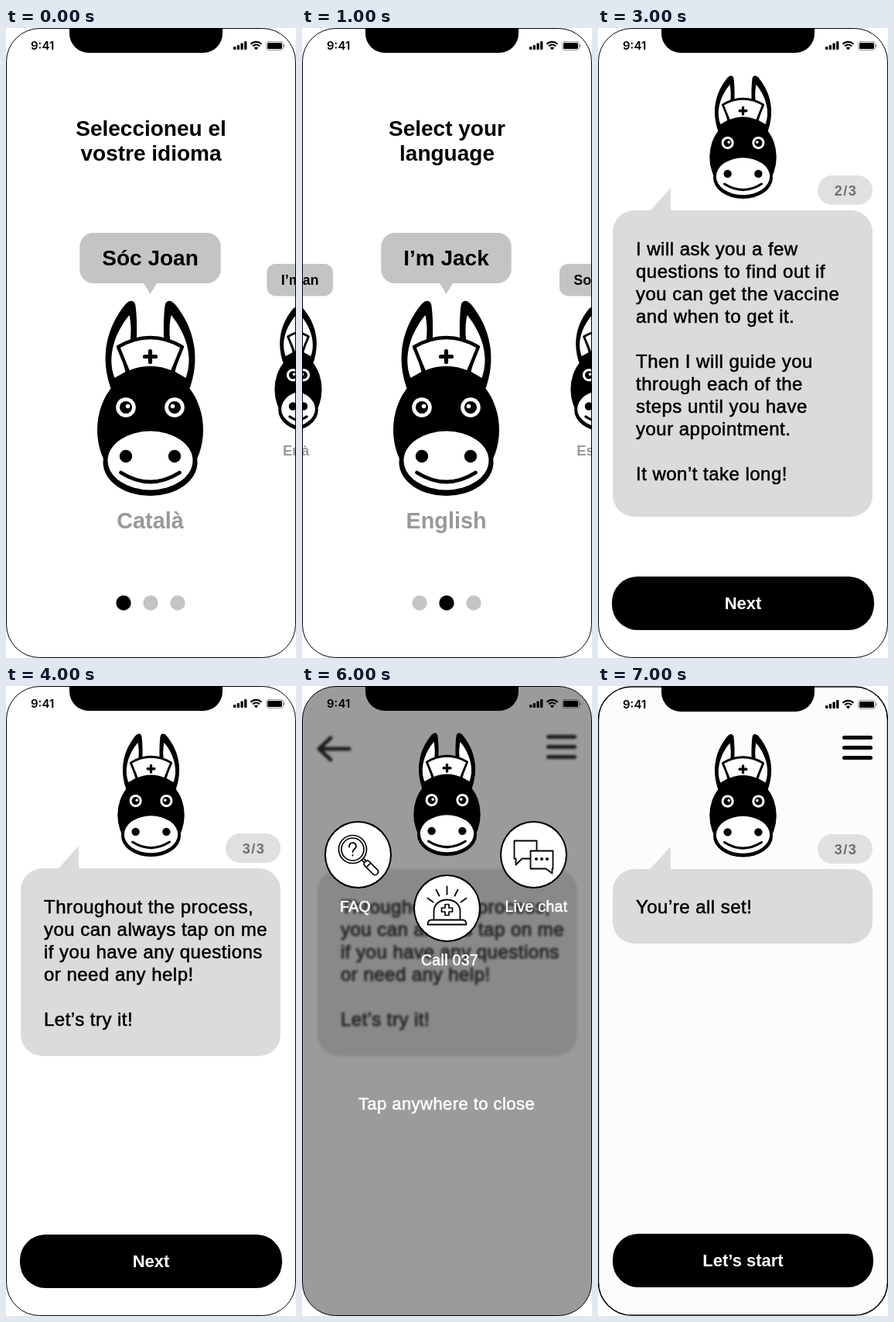
Recreate the animation shown at these times as an HTML page with a canvas. Size 375x812 px, loop 8000 ms.

```html
<!DOCTYPE html>
<html lang="en">
<head>
<meta charset="utf-8">
<title>Onboarding</title>
<style>
html, body { margin: 0; width: 100%; height: 100%; overflow: hidden; background: #fff; }
canvas { display: block; }
</style>
</head>
<body>
<canvas id="stage" width="375" height="812"></canvas>
<script>
const ctx = document.getElementById('stage').getContext('2d');
const SANS = '"Liberation Sans", Arial, sans-serif';
const SLIDE_MS = 1000;

function fillPath(d, color) {
  ctx.fillStyle = color;
  ctx.fill(new Path2D(d));
}

function strokePath(d, width, color = '#000') {
  ctx.lineWidth = width;
  ctx.strokeStyle = color;
  ctx.stroke(new Path2D(d));
}

function roundBox(left, top, right, bottom, radius, color) {
  ctx.beginPath();
  ctx.roundRect(left, top, right - left, bottom - top, radius);
  ctx.fillStyle = color;
  ctx.fill();
}

function ellipse(x, y, rx, ry, color) {
  ctx.beginPath();
  ctx.ellipse(x, y, rx, ry, 0, 0, Math.PI * 2);
  ctx.fillStyle = color;
  ctx.fill();
}

const disc = (x, y, r, color) => ellipse(x, y, r, r, color);

function bold(str, x, y, size, color = '#000') {
  ctx.font = `bold ${size}px ${SANS}`;
  ctx.textAlign = 'center';
  ctx.fillStyle = color;
  ctx.fillText(str, x, y);
}

// Regular weight thickened and slightly opened to a medium
function medium(str, x, y, size = 24, color = '#000', align = 'left') {
  ctx.font = `${size}px ${SANS}`;
  ctx.letterSpacing = `${size * 0.02}px`;
  ctx.textAlign = align;
  ctx.fillStyle = ctx.strokeStyle = color;
  ctx.lineWidth = 0.55;
  ctx.fillText(str, x, y);
  ctx.strokeText(str, x, y);
  ctx.letterSpacing = '0px';
}

// Donkey, with its centre line at x = 0 and ear tips at y = 0
function donkey(cx, top, scale) {
  ctx.save();
  ctx.translate(cx, top);
  ctx.scale(scale, scale);
  for (const side of [1, -1]) {
    ctx.save();
    ctx.scale(side, 1);
    fillPath('M-49 119C-67 74-56 34-32 5C-26-2-20 0-19 7C-17 24-17 39-18 60L-20 100Z', '#000');
    fillPath('M-46 100C-56 74-47 43-27 19C-24 33-25 45-26 55L-41 60L-32 92Z', '#fff');
    ctx.restore();
  }
  ellipse(0, 167, 68.5, 80, '#000');
  ellipse(0, 209, 61, 43, '#000');
  ellipse(0, 206.5, 55, 38, '#fff');
  for (const side of [-1, 1]) {
    const x = side * 31.5;
    disc(x, 138, 12.8, '#fff');
    disc(x, 138, 8, '#000');
    disc(x - side * 2.5, 136.5, 2.8, '#fff');
    disc(x, 201, 8.2, '#000');
  }
  strokePath('M-38 222Q0 246 38 222', 4.8);
  const cap = 'M-41.5 60Q0 36 41.5 60L28 93Q0 81-28 93Z';
  fillPath(cap, '#fff');
  strokePath(cap, 4.5);
  strokePath('M-7 72.5H7M0 65.5V79.5', 5.2);
  ctx.restore();
}

function statusBar(dy) {
  ctx.save();
  ctx.translate(0, dy);
  ctx.font = '600 15px Inter, sans-serif';
  ctx.textAlign = 'left';
  ctx.fillStyle = '#000';
  ctx.fillText('9:41', 32, 28);
  [4, 6, 8.5, 11].forEach((h, i) => roundBox(294 + i * 4.7, 28 - h, 297.3 + i * 4.7, 28, 1, '#000'));
  ctx.lineCap = 'butt';
  for (const r of [9.7, 6]) {
    ctx.beginPath();
    ctx.arc(323.5, 27.5, r, -Math.PI * 0.76, -Math.PI * 0.24);
    ctx.lineWidth = 2.2;
    ctx.strokeStyle = '#000';
    ctx.stroke();
  }
  ctx.lineCap = 'round';
  fillPath('M323.5 28.5L320.8 25.6Q323.5 23.3 326.2 25.6Z', '#000');
  ctx.beginPath();
  ctx.roundRect(336.5, 17.5, 22, 11, 3);
  ctx.lineWidth = 1;
  ctx.strokeStyle = 'rgba(0,0,0,.4)';
  ctx.stroke();
  roundBox(359.3, 21, 360.6, 25, 1, 'rgba(0,0,0,.4)');
  roundBox(338, 19, 357, 27, 1.6, '#000');
  ctx.restore();
}

function phone(background, inset, content) {
  const outline = new Path2D();
  outline.roundRect(0.5, 0.5 + inset / 2, 374, 811 - inset, 43);
  ctx.fillStyle = '#fff';
  ctx.fillRect(0, 0, 375, 812);
  ctx.save();
  ctx.clip(outline);
  ctx.fillStyle = background;
  ctx.fillRect(0, 0, 375, 812);
  content();
  ctx.restore();
  roundBox(82, 0, 280, 32 + inset, [0, 0, 25, 25], '#000');
  statusBar(inset);
  ctx.lineWidth = 1 + inset / 2;
  ctx.strokeStyle = '#000';
  ctx.stroke(outline);
}

// Language carousel
const languages = [
  { title: ['Seleccioneu el', 'vostre idioma'], hello: 'Sóc Joan', name: 'Català' },
  { title: ['Select your', 'language'], hello: 'I’m Jack', name: 'English' },
  { title: ['Seleccione', 'su idioma'], hello: 'Soy Juan', name: 'Español' }
];

function languageCard({ hello, name }, cx, active) {
  const scale = active ? 1 : 0.637;
  ctx.save();
  ctx.translate(cx, active ? 264 : 304);
  ctx.scale(scale, scale);
  ctx.font = `bold 28px ${SANS}`;
  const half = ctx.measureText(hello).width / 2 + 29;
  roundBox(-half, 0, half, 65, 18, '#c4c4c4');
  fillPath('M-9 64H9L0 79Z', '#c4c4c4');
  bold(hello, 0, 42, 28);
  donkey(0, 87, 1);
  bold(name, 0, active ? 381 : 387, 28.8, '#999');
  ctx.restore();
}

function carousel(current) {
  phone('#fff', 0, () => {
    languages[current].title.forEach((line, i) => bold(line, 187.5, 139 + i * 32, 28));
    languages.forEach((lang, i) => languageCard(lang, 186.5 + (i - current) * 204.5, i === current));
    languages.forEach((_, i) => disc(152 + i * 35, 741, 9.7, i === current ? '#000' : '#c4c4c4'));
  });
}

// Guided messages
const welcome = ['Welcome to Agulla Pic!', 'My name is Jack and I', 'will help you with your', 'vaccination process.'];
const details = ['I will ask you a few', 'questions to find out if', 'you can get the vaccine', 'and when to get it.', '',
  'Then I will guide you', 'through each of the', 'steps until you have', 'your appointment.', '', 'It won’t take long!'];
const tapHint = ['Throughout the process,', 'you can always tap on me', 'if you have any questions', 'or need any help!', '', 'Let’s try it!'];

function bubble(lines, bottom, { page, tail = true, dx = 0, dy = 0 } = {}) {
  roundBox(19 + dx, 235 + dy, 355 + dx, bottom, 28, '#dbdbdb');
  if (tail) fillPath(`M94 ${206 + dy}V236H67Z`, '#dbdbdb');
  lines.forEach((line, i) => medium(line, 49 + dx, 293 + i * 29));
  if (!page) return;
  roundBox(284, 190 + dy, 355, 228 + dy, 19, '#e0e0e0');
  ctx.letterSpacing = '1.5px';
  bold(page, 320.5, 216 + dy, 18, '#707070');
  ctx.letterSpacing = '0px';
}

function button(label, left, top, right) {
  roundBox(left, top, right, top + 69, 33, '#000');
  bold(label, (left + right) / 2, top + 42, 22, '#fff');
}

const smallDonkey = (top = 61) => donkey(187.5, top, 0.631);
const menu = () => strokePath('M318.5 66.5H352.5M318.5 79.5H352.5M318.5 92.5H352.5', 5);

function message(lines, page, bottom, left, top) {
  phone('#fff', 0, () => {
    smallDonkey();
    bubble(lines, bottom, { page });
    button('Next', left, top, 357);
  });
}

function dimmed(inset, backdrop, overlay) {
  phone('#fff', inset, () => {
    ctx.filter = 'blur(1.8px)';
    backdrop();
    ctx.filter = 'none';
    ctx.fillStyle = 'rgba(56,56,56,.502)';
    ctx.fillRect(0, 0, 375, 812);
    overlay();
  });
}

function tapMe() {
  dimmed(1, () => {
    menu();
    bubble(tapHint, 477, { page: '3/3', dy: 1 });
  }, () => {
    smallDonkey();
    strokePath('M88 166C92 147 110 135 133 137', 2, '#fff');
    fillPath('M132 131L142 138L131 144Z', '#fff');
    medium('Tap me', 45, 193, 21.6, '#fff');
  });
}

function badge(x, y, label, labelX, icon) {
  disc(x, y, 43.5, '#000');
  disc(x, y, 41.5, '#fff');
  ctx.save();
  ctx.translate(x, y);
  icon();
  ctx.restore();
  medium(label, labelX, y + 73.5, 19.4, '#fff', 'center');
}

function magnifier() {
  for (const r of [18, 14.5]) {
    ctx.beginPath();
    ctx.arc(-7, -7, r, 0, Math.PI * 2);
    ctx.lineWidth = 1.7;
    ctx.strokeStyle = '#000';
    ctx.stroke();
  }
  strokePath('M-11.5-10C-11.5-17-2.5-17-2.5-11C-2.5-7-7-8-7-3.5M-7 0.5V1', 1.8);
  ctx.rotate(Math.PI / 4);
  strokePath('M8-1.5H13M8 1.5H13M16-4H31Q35-4 35 0Q35 4 31 4H16Q13 4 13 0Q13-4 16-4ZM19-4V4', 1.7);
}

function chat() {
  strokePath('M-25-18H4V5H-15L-23 13V5H-25Z', 1.8);
  const front = 'M-4-5H25V18H24V24L16 18H-4Z';
  fillPath(front, '#fff');
  strokePath(front, 1.8);
  for (const x of [3.5, 10.5, 17.5]) disc(x, 5.5, 2, '#000');
}

function siren() {
  strokePath('M-17 15V4C-17-16 17-16 17 4V15M-25 21Q-25 15-20 15H20Q25 15 25 21Z', 1.8);
  strokePath('M-2.5-5H2.5V-0.5H7V4.5H2.5V9H-2.5V4.5H-7V-0.5H-2.5Z', 1.7);
  strokePath('M0-28V-18M-14-24L-10-16M14-24L10-16M-25-13L-18-8M25-13L18-8', 1.8);
}

function helpMenu() {
  dimmed(0, () => {
    ctx.save();
    ctx.translate(0, -1);
    menu();
    ctx.restore();
    strokePath('M61 81H23M37 67L22 81L37 95', 5);
    bubble(tapHint, 477, { tail: false, dx: 1, dy: 1 });
  }, () => {
    smallDonkey(60);
    badge(72.5, 217.5, 'FAQ', 69, magnifier);
    badge(299.5, 217.5, 'Live chat', 303, chat);
    badge(187.5, 286.5, 'Call 037', 191, siren);
    medium('Tap anywhere to close', 187, 545.5, 22, '#fff', 'center');
  });
}

function allSet() {
  phone('#fcfcfc', 1, () => {
    menu();
    smallDonkey(61.5);
    bubble(['You’re all set!'], 332, { page: '3/3', dy: 1 });
    button('Let’s start', 19, 706, 356);
  });
}

const slides = [
  () => carousel(0),
  () => carousel(1),
  () => message(welcome, '1/3', 419, 19, 705),
  () => message(details, '2/3', 630, 18, 707),
  () => message(tapHint, '3/3', 477, 18, 707),
  tapMe,
  helpMenu,
  allSet
];

ctx.lineCap = ctx.lineJoin = 'round';
const start = performance.now();
let shown = -1;

function tick() {
  const index = Math.floor((performance.now() - start) / SLIDE_MS) % slides.length;
  if (index !== shown) {
    slides[index]();
    shown = index;
  }
  requestAnimationFrame(tick);
}
tick();
</script>
</body>
</html>
```
